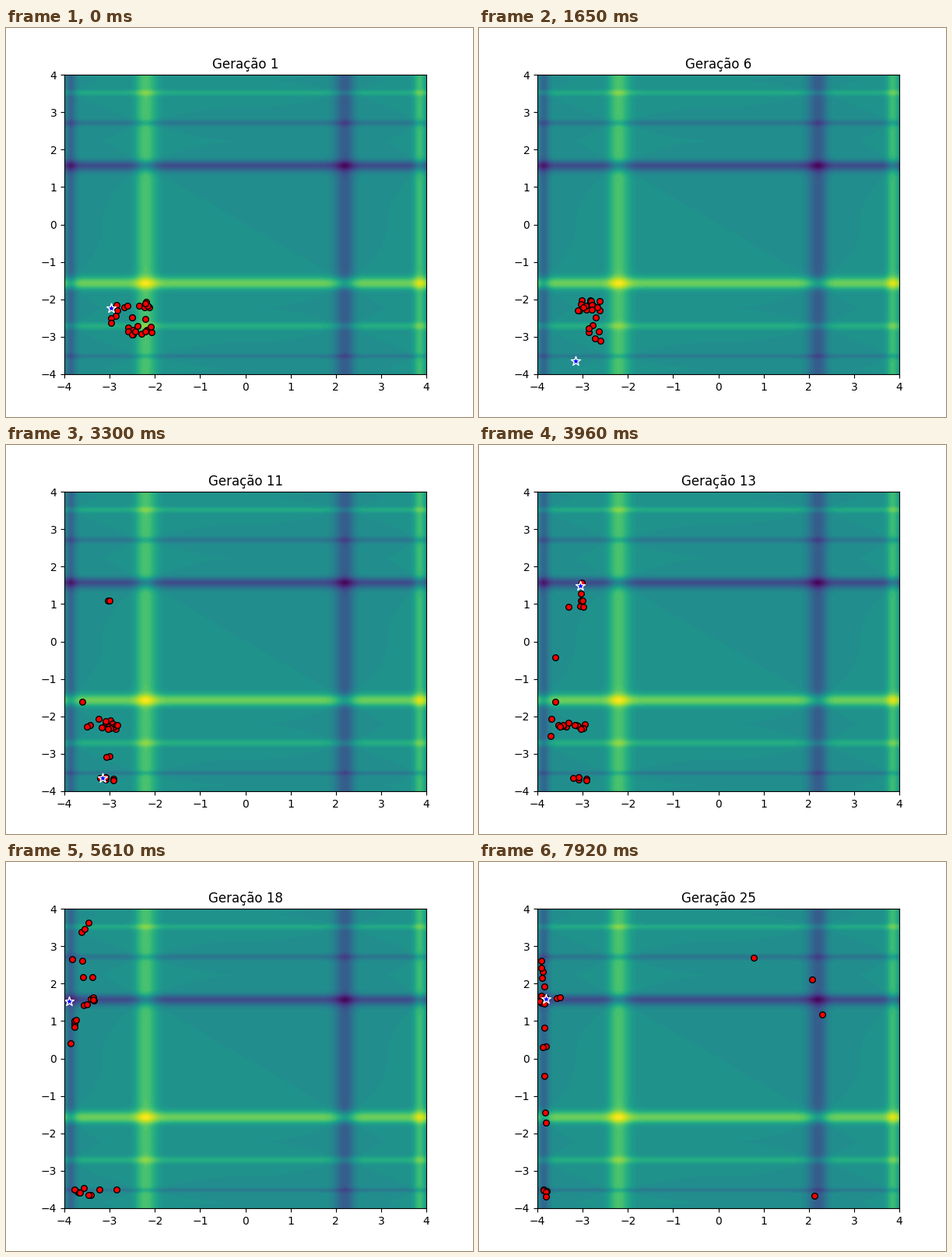
Write a matplotlib script that moves like this. It is 600 by 500 pixels and loops after 8000 ms.

```python
import numpy as np
import matplotlib.pyplot as plt
from matplotlib.animation import FuncAnimation

LOOP, STEP, HOLD = 8000, 20, 330  # ms
LIMIT = 4
GENERATIONS = 25
TURNOVER = 3   # generations a cloud takes to fill or to empty
NEVER = 99


def michalewicz(x, y, m=10):
    return -(np.sin(x) * np.sin(x**2 / np.pi) ** (2 * m)
             + np.sin(y) * np.sin(2 * y**2 / np.pi) ** (2 * m))


# size, centre x, y, half width, half height, complete at, empty at
CLOUDS = [
    (9, -2.45, -2.17, 0.40, 0.10, 1, 4),
    (7, -2.60, -2.50, 0.40, 0.25, 1, 4),
    (13, -2.30, -2.82, 0.30, 0.14, 1, 4),
    (16, -2.88, -2.18, 0.27, 0.17, 4, 9),
    (7, -2.72, -2.80, 0.16, 0.33, 4, 9),
    (16, -3.02, -2.20, 0.22, 0.14, 9, 13),
    (3, -3.08, -3.11, 0.08, 0.06, 9, 13),
    (5, -3.06, -3.68, 0.18, 0.06, 9, 18),
    (12, -3.25, -2.25, 0.32, 0.09, 13, 18),
    (7, -3.15, 1.27, 0.20, 0.36, 13, 18),
    (4, -3.62, -1.00, 0.10, 1.60, 13, 18),
    (7, -3.65, 2.90, 0.30, 0.80, 18, 22),
    (6, -3.45, 1.52, 0.15, 0.14, 18, 22),
    (5, -3.80, 0.60, 0.08, 0.55, 18, 22),
    (8, -3.50, -3.55, 0.30, 0.13, 18, 22),
    (5, -3.86, 2.35, 0.10, 0.50, 22, NEVER),
    (9, -3.72, 1.57, 0.27, 0.13, 22, NEVER),
    (6, -3.84, -0.60, 0.05, 1.80, 22, NEVER),
    (5, -3.83, -3.65, 0.05, 0.15, 22, NEVER),
]

# Lone individuals: x, y, first generation, first generation without them
SCOUTS = [
    (-3.36, -2.05, 4, 5), (-2.85, -3.50, 15, 25), (2.07, 2.11, 19, NEVER),
    (1.85, 1.50, 20, 23), (2.13, -3.67, 22, NEVER), (2.30, 1.17, 23, NEVER),
    (0.78, 2.69, 24, NEVER),
]

# Generation from which each best individual leads
LEADERS = {1: (-2.96, -2.24), 2: (-3.17, -2.13), 6: (-3.15, -3.65),
           12: (-3.05, 1.48), 17: (-3.89, 1.52), 24: (-3.81, 1.59)}


def spawn(rng, n, x, y, w, h, born, gone):
    """Rows of x, y, birth and death, staggered over the turnover."""
    lag = np.arange(n) * TURNOVER // n
    return np.column_stack([x + w * rng.uniform(-1, 1, n),
                            y + h * rng.uniform(-1, 1, n),
                            born - lag, gone - lag])


rng = np.random.default_rng(7)
people = np.vstack([spawn(rng, *cloud) for cloud in CLOUDS] + [SCOUTS])


def population(gen):
    born, gone = people[:, 2], people[:, 3]
    return people[(born <= gen) & (gen < gone), :2]


def leader(gen):
    return LEADERS[max(g for g in LEADERS if g <= gen)]


fig, ax = plt.subplots(figsize=(6, 5), dpi=100)
axis = np.linspace(-LIMIT, LIMIT, 300)
X, Y = np.meshgrid(axis, axis)
ax.contourf(X, Y, michalewicz(X, Y), levels=50, cmap="viridis")
ax.set(xlim=(-LIMIT, LIMIT), ylim=(-LIMIT, LIMIT))
title = ax.set_title("")
dots = ax.scatter([], [], s=30, c="red", edgecolors="black", zorder=2)
star = ax.scatter([], [], s=80, c="blue", marker="*", edgecolors="white",
                  zorder=2.2)


def update(i):
    gen = min(GENERATIONS, (i * STEP + STEP // 2) // HOLD + 1)
    title.set_text(f"Geração {gen}")
    dots.set_offsets(population(gen))
    star.set_offsets([leader(gen)])
    return title, dots, star


anim = FuncAnimation(fig, update, frames=LOOP // STEP, interval=STEP,
                     repeat=True, repeat_delay=0)
plt.show()
```
